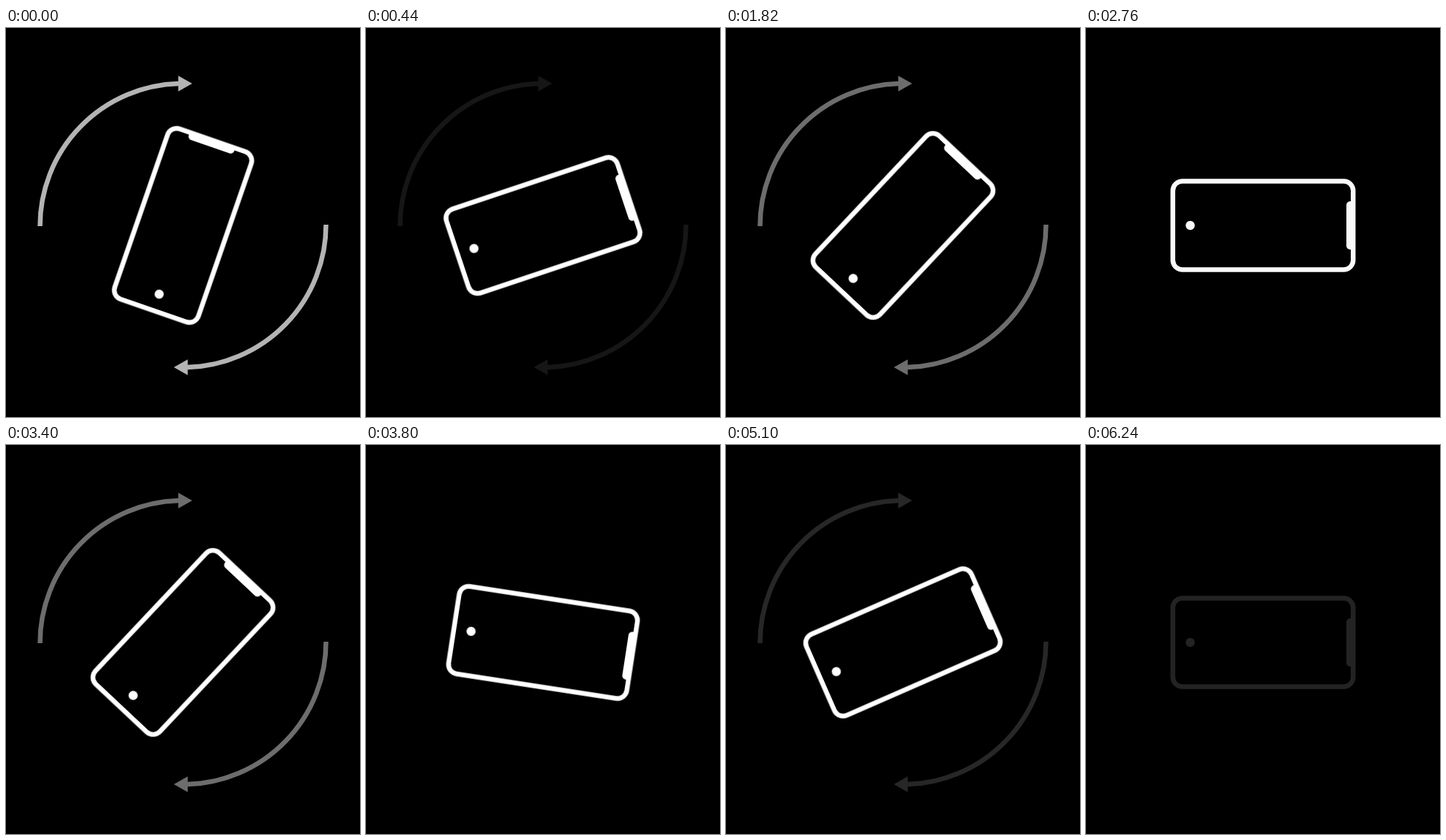
Animation, 484 px wide and 532 px high, one loop 6280 ms. Source, as an HTML page:

```html
<!DOCTYPE html>
<html lang="en">
<head>
<meta charset="utf-8">
<title>Rotate your phone</title>
<style>
  html, body { margin: 0; width: 100%; height: 100%; overflow: hidden; background: #000; }
  svg { display: block; width: 100%; height: 100%; }
</style>
</head>
<body>
<svg viewBox="-242 -270 484 532" fill="#fff">
  <defs>
    <g id="arrow">
      <path d="M-195.5 1A195 195 0 0 1 -6 -193.9" fill="none" stroke="#fff" stroke-width="6.5"/>
      <path d="M-6.5 -204.7L12.5 -194L-6.5 -183.3z"/>
    </g>
  </defs>
  <g id="arrows">
    <use href="#arrow"/>
    <use href="#arrow" transform="rotate(180)"/>
  </g>
  <g id="phone">
    <rect x="-60.5" y="-123.3" width="121" height="246.6" rx="13" fill="none" stroke="#fff" stroke-width="6.5"/>
    <path d="M-33 -124V-119.5a5.5 5.5 0 0 0 5.5 5.5H27.5a5.5 5.5 0 0 0 5.5 -5.5V-124z"/>
    <circle cy="99.5" r="6.2"/>
  </g>
</svg>
<script>
  const CYCLE = 1570, HOLD = 109, STEP = 33.3, LAST = 42;

  // Keys: [time in ms, value]
  const TURN = [[76, 19.1], [242, 43.2], [375, 66.3], [708, 97.2], [775, 90]];
  const ARROWS = [[76, 0.706], [242, 0.43], [375, 0.157], [452, 0]];
  const FADE = [[1142, 1], [1175, 0.976], [1374, 0.63], [1508, 0.135]];

  const arrows = document.getElementById('arrows');
  const phone = document.getElementById('phone');

  // Smooth curve through the keys, constant outside them
  function track(keys, t) {
    const n = keys.length - 1;
    if (t <= keys[0][0]) return keys[0][1];
    if (t >= keys[n][0]) return keys[n][1];
    const i = keys.findIndex(k => k[0] > t) - 1;
    const rate = j => (keys[j + 1][1] - keys[j][1]) / (keys[j + 1][0] - keys[j][0]);
    const slope = j => {
      if (j === 0) return rate(0);
      if (j === n) return rate(n - 1);
      const before = keys[j][0] - keys[j - 1][0], after = keys[j + 1][0] - keys[j][0];
      return (rate(j - 1) * after + rate(j) * before) / (before + after);
    };
    const [t0, a] = keys[i], [t1, b] = keys[i + 1];
    const d = t1 - t0, u = (t - t0) / d, v = 1 - u;
    return v * v * (1 + 2 * u) * a + u * u * (3 - 2 * u) * b
      + d * u * v * (v * slope(i) - u * slope(i + 1));
  }

  // The opening pose is held, then the picture advances in even steps
  function stepped(phase) {
    const i = Math.floor((phase - HOLD) / STEP);
    return HOLD + STEP * Math.max(-1, Math.min(LAST, i));
  }

  function draw(ms) {
    const t = stepped(ms % CYCLE);
    phone.setAttribute('transform', `rotate(${track(TURN, t).toFixed(2)})`);
    phone.setAttribute('opacity', t < 1160 ? 1 : track(FADE, t).toFixed(3));
    arrows.setAttribute('opacity', Math.max(0, track(ARROWS, t)).toFixed(3));
  }

  const start = performance.now();
  function tick() {
    draw(performance.now() - start);
    requestAnimationFrame(tick);
  }
  tick();
</script>
</body>
</html>
```
